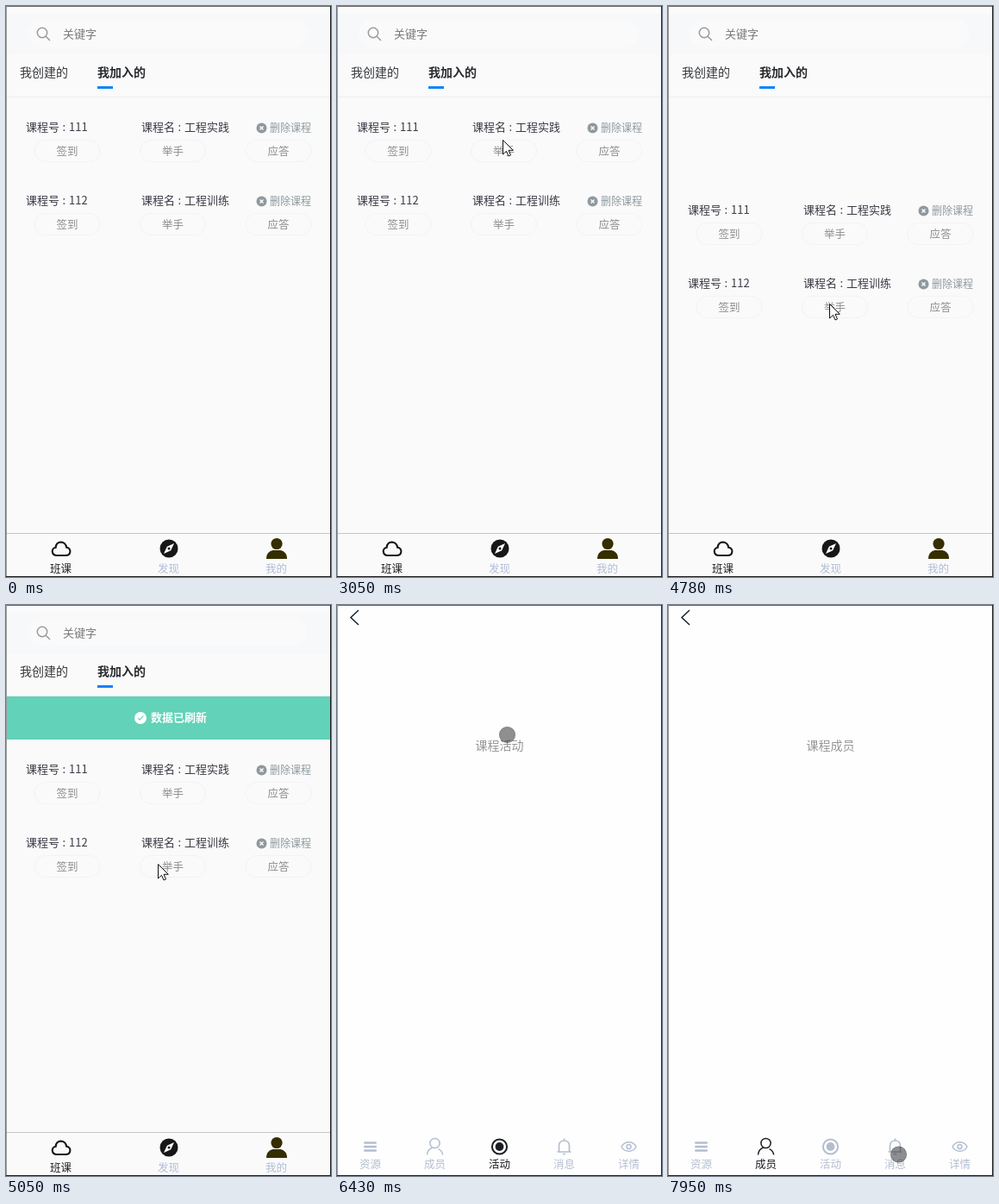
An HTML page with a canvas for the animation above (8000 ms loop, 377 px wide and 662 px high).

```html
<!DOCTYPE html>
<html lang="zh">
<head>
<meta charset="utf-8">
<style>
  html, body { margin: 0; width: 100%; height: 100%; overflow: hidden; background: #fafafa; }
  canvas { display: block; width: 377px; height: 662px; }
</style>
</head>
<body>
<canvas id="stage" width="377" height="662"></canvas>
<script>
const ctx = document.getElementById('stage').getContext('2d');
const LOOP = 8000, TICK = 134, OPEN_DETAIL = 6300, OPEN_MEMBERS = 7680;
const FONT = '"Noto Sans CJK SC", "Noto Sans CJK", "Noto Sans", sans-serif';
const MUTED = '#b4bed0', INK = '#1c1e24';

const mix = (a, b, p) => a + (b - a) * p;
const linear = p => p;
const slowStart = p => p ** 3;
const quickStart = p => p ** 0.84;

// Movement is seen in ticks: the first step shows at start, the last at end.
function progress(t, start, end, ease = linear) {
  const steps = Math.round((end - start) / TICK) + 1;
  const done = Math.floor((t - start) / (end - start) * (steps - 1) + 1);
  return ease(Math.max(0, Math.min(steps, done)) / steps);
}

const ENTRY = { x: 375, y: 430 };
const drag = { start: 4390, end: 4780, x: 187, y: 345 };
const release = { start: 4930, end: 5050, x: 176, y: 300 };
const moves = [
  { start: 500, end: 1430, x: 198, y: 195 },
  { start: 1680, end: 2220, x: 198, y: 164, ease: slowStart },
  { start: 2620, end: 3170, x: 191, y: 153 },
  { start: 3820, end: 4240, x: 191, y: 162 },
  drag,
  release,
  { start: 5760, end: OPEN_DETAIL, x: 197.5, y: 150.5, ease: slowStart },
  { start: 6710, end: 7400, x: 126, y: 643 },
  { start: 7810, end: 7950, x: 267.5, y: 637 }
];

function pointerAt(t) {
  return moves.reduce((pos, { start, end, x, y, ease }) => {
    const p = progress(t, start, end, ease);
    return { x: mix(pos.x, x, p), y: mix(pos.y, y, p) };
  }, ENTRY);
}

const PULLED = 96, BANNER = 50;
function listOffset(t) {
  const pulled = PULLED * progress(t, drag.start, drag.end);
  const settled = mix(pulled, BANNER, progress(t, release.start, release.end));
  return mix(settled, 0, progress(t, 5760, 5880, quickStart));
}

function text(str, x, y, size, color, { align = 'left', weight = 400 } = {}) {
  ctx.font = `${weight} ${size}px ${FONT}`;
  ctx.textAlign = align;
  ctx.fillStyle = color;
  ctx.fillText(str, x, y + size * 0.37);
}
const label = (str, x, y, color, size = 12.5) => text(str, x, y, size, color, { align: 'center' });

function rect(x, y, w, h, color) {
  ctx.fillStyle = color;
  ctx.fillRect(x, y, w, h);
}
function disc(x, y, r, color) {
  ctx.beginPath();
  ctx.arc(x, y, r, 0, Math.PI * 2);
  ctx.fillStyle = color;
  ctx.fill();
}
function ring(x, y, r, color, width) {
  ctx.beginPath();
  ctx.arc(x, y, r, 0, Math.PI * 2);
  ctx.strokeStyle = color;
  ctx.lineWidth = width;
  ctx.stroke();
}
function pill(x, y, w, h, fill, stroke) {
  ctx.beginPath();
  ctx.roundRect(x, y, w, h, h / 2);
  ctx.fillStyle = fill;
  ctx.fill();
  if (!stroke) return;
  ctx.strokeStyle = stroke;
  ctx.lineWidth = 1;
  ctx.stroke();
}
function path(d, x, y, { fill, stroke, width = 1.5 }) {
  ctx.save();
  ctx.translate(x, y);
  const shape = new Path2D(d);
  if (fill) {
    ctx.fillStyle = fill;
    ctx.fill(shape);
  }
  if (stroke) {
    ctx.strokeStyle = stroke;
    ctx.lineWidth = width;
    ctx.stroke(shape);
  }
  ctx.restore();
}

function header() {
  rect(0, 0, 377, 9, '#fbfbfb');
  rect(0, 9, 377, 47, '#f7f8fa');
  pill(25, 16, 325, 32, '#fafafa');
  ring(42, 31, 5.7, '#9a9a9a', 1.5);
  path('M4.2 4.2L9 9', 42, 31, { stroke: '#9a9a9a' });
  text('关键字', 66, 32, 13, '#7a7a7a');
  text('我创建的', 16, 77, 14, '#36383c');
  text('我加入的', 106, 77, 14, '#2a2c30', { weight: 700 });
  rect(106, 93, 18, 3, '#1085f8');
  rect(0, 105, 377, 1, '#eeeeee');
}

function field(title, value, x, y) {
  const ink = '#3a3b45';
  text(title, x, y, 13, ink);
  text(':', x + 42.5, y, 13, ink);
  text(value, x + 50, y, 13, ink);
}

function course(number, name, y) {
  const gray = '#8e999e';
  field('课程号', number, 23, y);
  field('课程名', name, 157, y);
  disc(296.5, y + 1.5, 6, gray);
  path('M-2 -2L2 2M2 -2L-2 2', 296.5, y + 1.5, { stroke: '#fff', width: 1.3 });
  text('删除课程', 306, y + 2, 12, gray);
  ['签到', '举手', '应答'].forEach((action, i) => {
    const x = 33 + i * 122.5;
    pill(x, y + 15.5, 76, 25, '#fafafa', '#f3f3f3');
    label(action, x + 38, y + 28, '#8d8d8d');
  });
}

function banner(height) {
  const mid = 106 + height / 2, green = '#62d2b9';
  ctx.save();
  ctx.globalAlpha = Math.min(1, height / BANNER);
  rect(1, 106, 375, height, green);
  ctx.globalAlpha = 1;
  disc(156, mid, 7, '#fff');
  path('M-3 0L-1 2.2L3.4 -2.4', 156, mid, { stroke: green, width: 1.1 });
  text('数据已刷新', 168, mid - 0.5, 13, '#fff', { weight: 700 });
  ctx.restore();
}

function mainTabs() {
  rect(0, 611, 377, 1, '#c6c6c6');
  path('M-5 8H5C12 8 12 -1 6.2 -1.2C5 -9.5 -6 -9.5 -6.3 -1.2C-12 -.5 -11.5 8 -5 8Z',
    64, 629, { stroke: '#151515', width: 2.1 });
  disc(189, 629, 10.5, '#171717');
  path('M6 -6L2.2 2.2L-6 6L-2.2 -2.2Z', 189, 629, { fill: '#fff' });
  disc(189, 629, 1.5, '#171717');
  const olive = '#352e00';
  disc(314, 623.5, 6.6, olive);
  path('M-12 11.5C-12 5 -8.5 2.5 -4.5 1.5H4.5C8.5 2.5 12 5 12 11.5Z', 314, 629.5, { fill: olive });
  ['班课', '发现', '我的'].forEach((name, i) =>
    label(name, 63.5 + i * 125, 652.5, i ? '#b0bdd6' : '#222'));
}

function listPage(t) {
  const offset = listOffset(t);
  rect(0, 0, 377, 662, '#fafafa');
  header();
  course('111', '工程实践', 140 + offset);
  course('112', '工程训练', 225 + offset);
  if (t >= release.start && offset > 0) banner(offset);
  mainTabs();
}

const detailTabs = [
  ['资源', (x, c) => [623.5, 628, 632.5].forEach(y => pill(x - 7.5, y - 1.2, 15, 2.5, c))],
  ['成员', (x, c) => {
    ring(x, 624, 5.6, c, 1.5);
    path('M-9 9.5C-8.5 4 -6 2 -3 1.2M4 2.6C7 4 8.7 6 9.2 9.5', x, 628, { stroke: c });
  }],
  ['活动', (x, c) => {
    ring(x, 628, 8.6, c, 2);
    disc(x, 628, 4.9, c);
  }],
  ['消息', (x, c) => path('M-8 6H8M-6 6V-1C-6 -9 6 -9 6 -1V6M-1.5 8.5H1.5M0 -7V-9.5', x, 628, { stroke: c, width: 1.7 })],
  ['详情', (x, c) => {
    path('M-8.5 0C-5 -7 5 -7 8.5 0C5 7 -5 7 -8.5 0Z', x, 628, { stroke: c });
    ring(x, 628, 2.5, c, 1.5);
  }]
];

function detailPage(t) {
  const active = t < OPEN_MEMBERS ? 2 : 1;
  rect(0, 0, 377, 662, '#fefefe');
  path('M25 6L16 14.5L25 23', 0, 0, { stroke: '#14202c' });
  label('课程' + detailTabs[active][0], 188.5, 163, '#969896', 14);
  detailTabs.forEach(([name, icon], i) => {
    const x = 38.5 + i * 75, color = i === active ? INK : MUTED;
    icon(x, color);
    label(name, x, 648, color);
  });
}

function drawPointer(t) {
  if (t < moves[0].start) return;
  const { x, y } = pointerAt(t);
  if (t >= OPEN_DETAIL) {
    disc(x, y, 9.5, 'rgba(40, 40, 40, 0.52)');
    ring(x, y, 9, 'rgba(40, 40, 40, 0.15)', 1);
  } else {
    path('M0 0V16.5L4 12.8L6.5 18.5L9 17.4L6.5 11.8H11.8Z', Math.round(x) + 0.5, Math.round(y) + 0.5,
      { fill: '#fff', stroke: '#111', width: 1 });
  }
}

function frameEdges() {
  rect(0, 0, 377, 1, '#6c6c6c');
  rect(0, 0, 1, 662, '#9a9a9a');
  rect(376, 0, 1, 662, '#1c1c1c');
  rect(0, 661, 377, 1, '#1c1c1c');
}

function render(now) {
  const t = now % LOOP;
  (t < OPEN_DETAIL ? listPage : detailPage)(t);
  drawPointer(t);
  frameEdges();
  requestAnimationFrame(render);
}
requestAnimationFrame(render);
</script>
</body>
</html>
```
